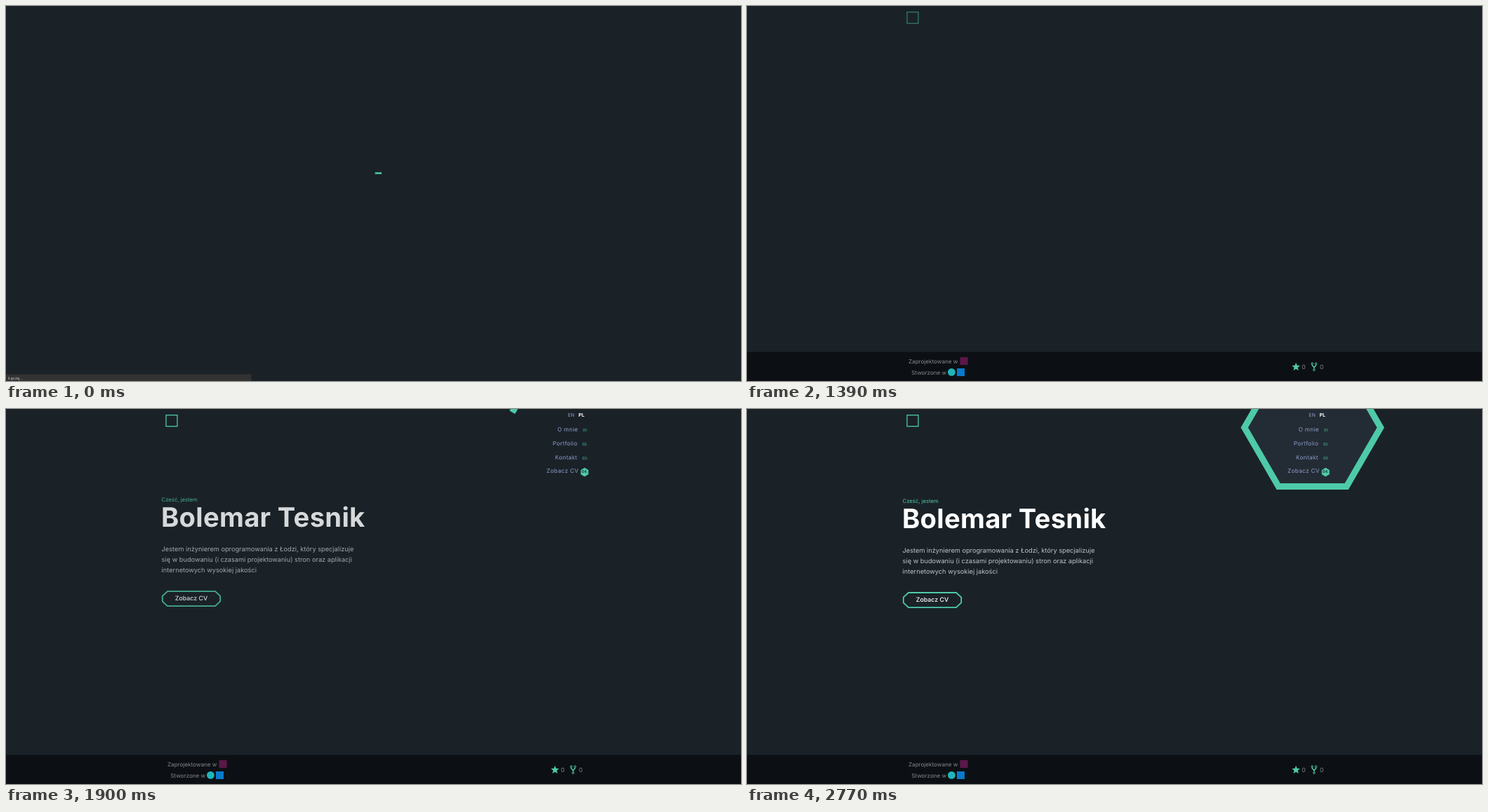
Recreate the animation shown at these times as an HTML page. Size 1047 by 535 pixels, loop 3100 ms.

```html
<!DOCTYPE html>
<html lang="pl">
<head>
<meta charset="utf-8">
<title>Portfolio</title>
<style>
  html, body { margin: 0; width: 100%; height: 100%; overflow: hidden; background: #1a2228; }
  svg { display: block; width: 100%; height: 100%; }
  text { font-family: Inter, "Open Sans", sans-serif; text-rendering: geometricPrecision; }
  .line { fill: none; stroke: #4ecaa9; }
  .green { fill: #4ecaa9; }
  .nav text { font-size: 8.2px; letter-spacing: .33px; fill: #8d9aca; }
  .nav .num { font-size: 5.3px; letter-spacing: 0; fill: #4ecaa9; }
  .nav .dark { fill: #1a2228; font-weight: 600; }
  .lang { font-size: 7px; fill: #8d9aca; }
  .title { font-size: 38.2px; font-weight: 700; letter-spacing: .3px; fill: #fff; }
  .copy { font-size: 9.22px; fill: #bfc3c6; }
  .foot { font-size: 8.1px; fill: #85878a; }
</style>
</head>
<body>
<svg viewBox="0 0 1047 535" preserveAspectRatio="none">
  <rect width="1047" height="535" fill="#1a2228"/>

  <g id="status">
    <rect y="525.5" width="349.5" height="9.5" fill="#323232"/>
    <text x="3" y="533" font-size="5.8" fill="#c4c4c4">Łączę…</text>
  </g>

  <g id="intro">
    <path id="mark" class="line" stroke-width="2.7" pathLength="100"
      d="M525.7 238.5H554.5V296H497V238.5Z"/>
  </g>

  <g id="page">
    <path id="panel" fill="#232c34"/>
    <path id="ring" class="line" stroke-width="9"/>

    <rect id="logo" class="line" x="228" y="8.7" width="16" height="16" stroke-width="1.3"/>
    <g id="lang" class="lang">
      <text x="800.3" y="10.5">EN</text>
      <text x="815.4" y="10.5" style="fill:#fff;font-weight:700">PL</text>
    </g>
    <g id="nav" class="nav">
      <g><text x="785.5" y="32">O mnie</text><text class="num" x="821.7" y="32">01.</text></g>
      <g><text x="778.8" y="51.7">Portfolio</text><text class="num" x="820.7" y="51.7">02.</text></g>
      <g><text x="782" y="71.5">Kontakt</text><text class="num" x="820.9" y="71.5">03.</text></g>
      <g>
        <text x="770" y="91.2">Zobacz CV</text>
        <path id="badge" class="green"/>
        <text class="num dark" x="819.9" y="91.3">04.</text>
      </g>
    </g>

    <g id="hero">
      <text class="green" x="221.6" y="134" font-size="7.7">Cześć, jestem</text>
      <text class="title" x="221" y="170">Bolemar Tesnik</text>
      <g class="copy">
        <text x="221.6" y="205.2">Jestem inżynierem oprogramowania z Łodzi, który specjalizuje</text>
        <text x="221.6" y="220">się w budowaniu (i czasami projektowaniu) stron oraz aplikacji</text>
        <text x="221.6" y="234.8">internetowych wysokiej jakości</text>
      </g>
      <path class="line" stroke-width="1.8" d="M230 262H298L305.2 268.7V276.4L298 283.1H230L222.8 276.4V268.7Z"/>
      <text x="264" y="275.4" font-size="8.8" font-weight="500" fill="#fff" text-anchor="middle">Zobacz CV</text>
    </g>

    <g class="foot">
      <rect y="493.5" width="1047" height="41.5" fill="#0c1014"/>
      <text x="230" y="510.4">Zaprojektowane w</text>
      <rect x="303.5" y="501" width="11" height="11" fill="#5c1748"/>
      <text x="234.2" y="526.4">Stworzone w</text>
      <circle cx="291.4" cy="522.4" r="5.4" fill="#1fb5ba"/>
      <rect x="299" y="517" width="11" height="11" fill="#087acb"/>
      <path id="star" class="green"/>
      <text x="790.3" y="518" font-size="8.6">0</text>
      <g class="line" stroke-width="1">
        <circle cx="805.1" cy="510.2" r="1.3"/>
        <circle cx="810.5" cy="510.2" r="1.3"/>
        <circle cx="807.8" cy="519.2" r="1.3"/>
        <path stroke-width="1.5" d="M805.1 511.6V512.8L807.8 515.4L810.5 512.8V511.6M807.8 515.2V517.8"/>
      </g>
      <text x="816" y="518" font-size="8.6">0</text>
    </g>
  </g>
</svg>
<script>
  const LOOP = 3100;
  const $ = id => document.getElementById(id);
  const clamp = x => Math.max(0, Math.min(1, x));
  const span = (t, start, length) => clamp((t - start) / length);
  const inOut = (u, n) => u < .5 ? (2 * u) ** n / 2 : 1 - (2 - 2 * u) ** n / 2;

  // Closed polygon whose radius cycles through the given radii.
  function polygon(cx, cy, sides, radii, startDeg, dir = 1) {
    const points = [];
    for (let i = 0; i < sides; i++) {
      const a = (startDeg + dir * i * 360 / sides) * Math.PI / 180;
      const r = radii[i % radii.length];
      points.push((cx + r * Math.cos(a)).toFixed(2) + " " + (cy + r * Math.sin(a)).toFixed(2));
    }
    return "M" + points.join("L") + "Z";
  }

  // The ring runs counterclockwise from its top left corner.
  const RING = 97 * 6;
  const hex = polygon(805.6, 26.5, 6, [97], 240, -1);
  $("ring").setAttribute("d", hex);
  $("panel").setAttribute("d", hex);
  $("badge").setAttribute("d", polygon(824.2, 90.1, 6, [6.3], -90));
  $("star").setAttribute("d", polygon(782, 515, 10, [6.2, 2.7], -90));

  const show = (el, on) => el.style.display = on ? "" : "none";

  function drawOn(el, p, length) {
    show(el, p > 0);
    el.setAttribute("stroke-dasharray", p < 1 ? `${p * length} ${length * 2}` : "none");
  }

  function fadeDown(el, t, start) {
    const p = inOut(span(t, start, 300), 3);
    el.setAttribute("opacity", p);
    el.setAttribute("transform", `translate(0 ${-10.9 * (1 - p)})`);
  }

  const items = [...$("nav").children];

  function render(t) {
    show($("status"), t < 90);

    show($("intro"), t < 1040);
    drawOn($("mark"), inOut(span(t, -186, 700), 4), 100);
    const out = inOut(span(t, 825, 300), 4);
    const scale = 1 - .9 * out;
    $("intro").setAttribute("opacity", 1 - out);
    $("intro").setAttribute("transform",
      `translate(525.7 267.3) scale(${scale}) translate(-525.7 -267.3)`);

    show($("page"), t >= 1270);
    $("logo").setAttribute("opacity", inOut(span(t, 1240, 300), 3));
    fadeDown($("lang"), t, 1320);
    items.forEach((el, i) => fadeDown(el, t, 1395 + 30 * i));
    fadeDown($("hero"), t, 1707);
    drawOn($("ring"), span(t, 1750, 1222), RING);
    $("panel").setAttribute("opacity", span(t, 2450, 320));
  }

  const began = performance.now();
  function tick() {
    render((performance.now() - began) % LOOP);
    requestAnimationFrame(tick);
  }
  tick();
</script>
</body>
</html>
```
